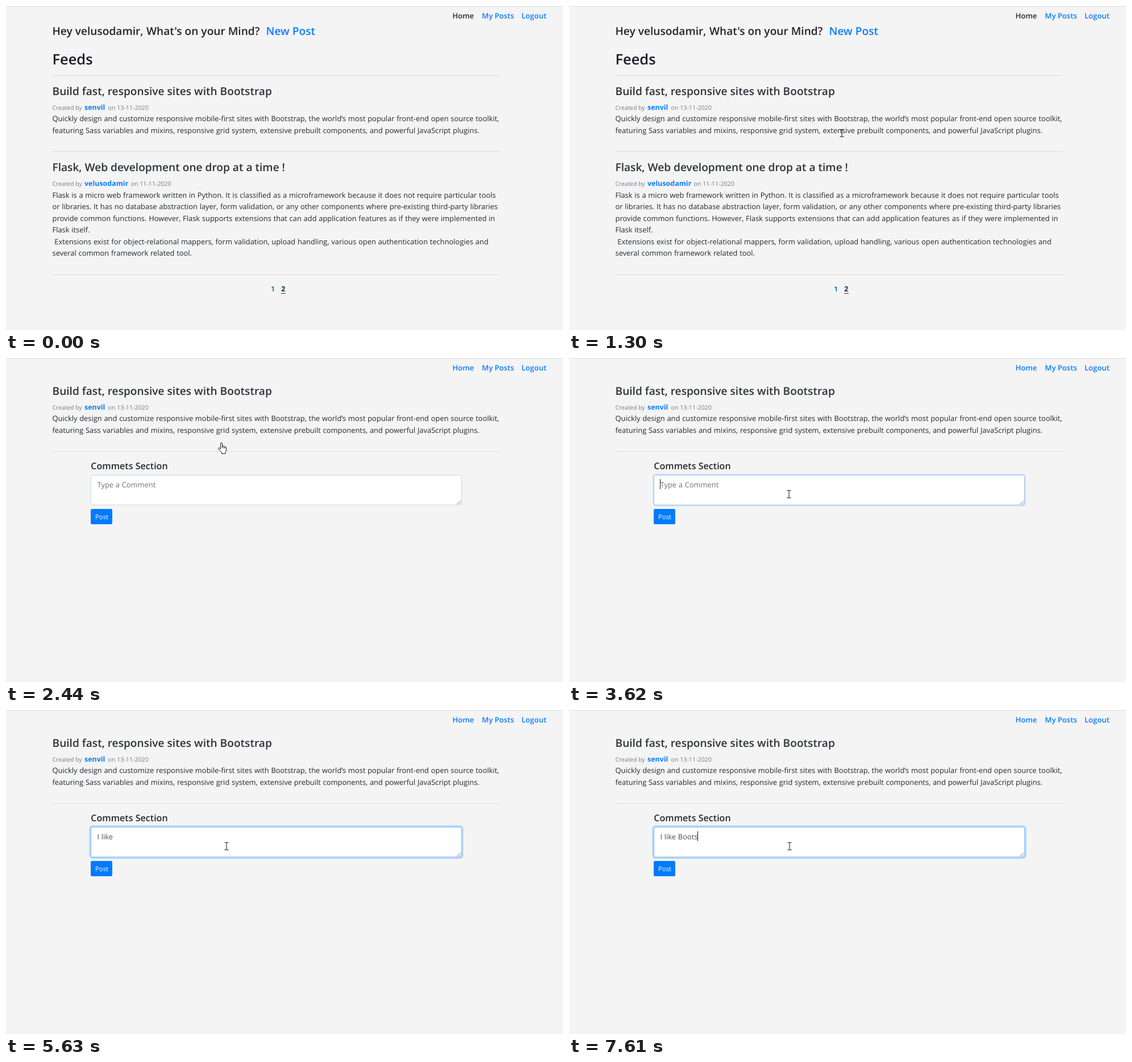
An HTML page for the animation above (8 s loop, 980 by 571 pixels).

```html
<!DOCTYPE html>
<html lang="en">
<head>
<meta charset="utf-8">
<title>Blog feed and comment</title>
<style>
  html, body { margin: 0; width: 100%; height: 100%; overflow: hidden; background: #f4f4f4; }
  svg { display: block; width: 100%; height: 100%; }
  text {
    font-family: "Open Sans", "Noto Sans", sans-serif;
    text-rendering: geometricPrecision;
    white-space: pre;
  }
  .body { font-size: 12.92px; word-spacing: .36px; fill: #26292d; }
  .head { font-size: 19.14px; font-weight: 600; fill: #2f3337; }
  .dark { fill: #212529; }
  .feeds { font-size: 25.45px; font-weight: 600; fill: #1c1c26; }
  .sub { font-size: 16.1px; font-weight: 600; fill: #26292d; }
  .nav { font-size: 13.1px; font-weight: 600; fill: #0a7cff; }
  .meta { font-size: 10.38px; fill: #747c84; }
  .date { font-size: 10.65px; fill: #747c84; }
  .bold { font-size: 12.45px; font-weight: 700; }
  .blue { fill: #0a7cff; }
  .button { font-size: 11.37px; fill: #fff; }
  .hint { fill: #6c757d; }
  .typed { fill: #495057; }
  .rule { fill: #dcdcdc; }
  .pointer { stroke: #111; stroke-width: 1; stroke-linejoin: round; fill: #fff; }
</style>
</head>
<body>
<svg id="stage" viewBox="0 0 980 571" preserveAspectRatio="none"></svg>
<script>
const LOOP = 8000;
const LEFT = 81.5;
const stage = document.getElementById('stage');

const text = (x, y, cls, str, id = '') =>
  `<text x="${x}" y="${y}" class="${cls}"${id && ` id="${id}"`}>${str}</text>`;
const rule = y => `<rect class="rule" x="81.5" y="${y}" width="788" height="1"/>`;

function article(y, title, author, dateX, date, lines, id) {
  return text(LEFT, y, 'head', title, id)
    + text(LEFT, y + 26, 'meta', 'Created by')
    + text(138, y + 26, 'bold blue', author)
    + text(dateX, y + 26, 'date', 'on ' + date)
    + lines.map((line, i) => text(LEFT, y + 46.5 + i * 20.5, 'body', line)).join('')
    + rule(y + 59.5 + lines.length * 20.5 - (lines.length > 2 ? .5 : 1));
}

const bootstrapLines = [
  'Quickly design and customize responsive mobile-first sites with Bootstrap, the world’s most popular front-end open source toolkit,',
  'featuring Sass variables and mixins, responsive grid system, extensive prebuilt components, and powerful JavaScript plugins.'
];
const flaskLines = [
  'Flask is a micro web framework written in Python. It is classified as a microframework because it does not require particular tools',
  'or libraries. It has no database abstraction layer, form validation, or any other components where pre-existing third-party libraries',
  'provide common functions. However, Flask supports extensions that can add application features as if they were implemented in',
  'Flask itself.',
  ' Extensions exist for object-relational mappers, form validation, upload handling, various open authentication technologies and',
  'several common framework related tool.'
];

stage.innerHTML = `
  <rect width="980" height="571" fill="#f4f4f4"/>
  <rect width="980" height="1" fill="#dedede"/>
  ${text(785.5, 21.5, 'nav', 'Home', 'home')}
  ${text(837.3, 21.5, 'nav', 'My Posts')}
  ${text(907, 21.5, 'nav', 'Logout')}
  <g id="post">
    ${article(156.5, 'Build fast, responsive sites with Bootstrap', 'senvil', 179.5, '13-11-2020', bootstrapLines, 'title')}
  </g>
  <g id="feed">
    ${text(LEFT, 51, 'head dark', 'Hey velusodamir,')}
    ${text(247, 51, 'head dark', "What's on your Mind?")}
    ${text(457.5, 51, 'head blue', 'New Post')}
    ${text(LEFT, 102.5, 'feeds', 'Feeds')}
    ${rule(122)}
    ${article(291, 'Flask, Web development one drop at a time !', 'velusodamir', 219.5, '11-11-2020', flaskLines)}
    ${text(466, 502.5, 'bold blue', '1')}
    ${text(484.3, 502.5, 'bold dark', '2')}
    <rect x="484" y="506" width="8" height="1" fill="#333"/>
  </g>
  <g id="comments">
    ${text(149.3, 196, 'sub', 'Commets Section')}
    <rect id="glow" fill="#007bff"/>
    <rect id="box" x="149.5" y="206.5" width="652" height="52.5" rx="3" fill="#fff"/>
    <path d="M793.5 258l6.5-6.5M797.5 258l2.5-2.5" stroke="#777" fill="none"/>
    ${text(160.5, 228, 'body hint', 'Type a Comment', 'hint')}
    ${text(160.5, 228, 'body typed', '', 'typed')}
    <rect id="caret" y="213.5" width="1" height="17.5" fill="#111"/>
    <rect x="149" y="266" width="38" height="27" rx="2.7" fill="#007bff"/>
    ${text(157, 284, 'button', 'Post')}
  </g>
  <g class="pointer">
    <path id="arrow" d="M.5 .5V14l3.2-3 2.1 5.2 2-.8-2.1-5H10z"/>
    <path id="beam" fill="none" d="M-3.5-6.5h2.5l1 .7 1-.7h2.5M0-6V6M-3.5 6.5h2.5l1-.7 1 .7h2.5"/>
    <g id="hand">
      <path d="M-1.5 11.5V2a1.5 1.5 0 0 1 3 0V7a1.4 1.4 0 0 1 2.7.3a1.4 1.4 0 0 1 2.5.6a1.2 1.2 0 0 1 1.8 1V13q0 2.5-1.5 4.5v2H.5v-2Q-3 14-5.1 11.2q-.6-1.2.5-1.8 1-.4 2 .8z"/>
      <path d="M1.5 7v3M4.2 7.5v2.7M6.7 8v2.2" fill="none"/>
    </g>
  </g>`;

const el = id => document.getElementById(id);
const show = (id, on) => el(id).setAttribute('visibility', on ? 'visible' : 'hidden');
const set = (id, attrs) => {
  for (const name in attrs) el(id).setAttribute(name, attrs[name]);
};

// time, x, y, steps towards the next stop (0 = wait), ease-out power
const track = [
  [430, 966, 556, 3, 1],
  [664, 882, 472, 7, 1],
  [1210, 536, 241, 0, 1],
  [1300, 480, 224, 7, 1.5],
  [1810, 373, 139, 0, 1],
  [1980, 379, 149, 0, 1],
  [2750, 379, 149, 5, 1],
  [3150, 387, 240, 0, 1],
  [4080, 388, 240, 0, 1]
];

// time, text so far, caret position
const typing = [
  [0, '', 160],
  [4390, 'I', 164],
  [4540, 'I ', 168],
  [4620, 'I l', 171],
  [4700, 'I li', 174],
  [4850, 'I lik', 182],
  [4930, 'I like', 188],
  [5080, 'I like ', 191],
  [6430, 'I like B', 200],
  [6660, 'I like Bo', 208],
  [6810, 'I like Boo', 216],
  [6970, 'I like Boot', 221],
  [7370, 'I like Boo', 216],
  [7440, 'I like Boot', 221],
  [7610, 'I like Boots', 226]
];

const lastIndex = (list, t) => list.reduce((found, item, i) => item[0] <= t ? i : found, -1);

function pointerAt(t) {
  const i = lastIndex(track, t);
  if (i < 0) return null;
  const [t0, x, y, steps, power] = track[i];
  if (!steps) return [x, y];
  const [t1, x1, y1] = track[i + 1];
  const p = Math.floor((t - t0) / (t1 - t0) * steps + .02) / steps;
  const e = 1 - (1 - p) ** power;
  return [x + (x1 - x) * e, y + (y1 - y) * e];
}

function pointerKind(x, y, onFeed) {
  if (!onFeed) return y < 150 ? 'hand' : y > 206 ? 'beam' : 'arrow';
  if (y < 163 && x < 468) return 'hand';
  const overText = (y > 187 && y < 230) || (y > 323 && y < 445);
  return overText && x < 869 ? 'beam' : 'arrow';
}

function drawPointer(t, onFeed) {
  const pos = pointerAt(t);
  const kind = pos && pointerKind(...pos, onFeed);
  for (const id of ['arrow', 'beam', 'hand']) {
    show(id, id === kind);
    if (id === kind) set(id, { transform: `translate(${Math.round(pos[0])} ${Math.round(pos[1])})` });
  }
  return kind;
}

function drawComment(t) {
  const focus = t < 3530 ? 0 : t < 3620 ? .3 : t < 3700 ? .65 : 1;
  const grow = 2.7 * focus;
  set('glow', {
    x: 149 - grow, y: 206 - grow, width: 653 + 2 * grow, height: 53.5 + 2 * grow,
    rx: 3.5 + grow, opacity: .25 * focus
  });
  const mix = (a, b) => Math.round(a + (b - a) * focus);
  set('box', { stroke: `rgb(${mix(206, 128)},${mix(212, 189)},${mix(218, 255)})` });

  const [, str, caretX] = typing[lastIndex(typing, t)];
  el('typed').textContent = str;
  show('hint', !str);
  const blinkOff = (t >= 4000 && t < 4390) || (t >= 5630 && t < 6180);
  set('caret', { x: caretX });
  show('caret', t >= 3530 && !blinkOff);
}

function render(t) {
  const onFeed = t < 2440;
  el('feed').style.display = onFeed ? '' : 'none';
  el('comments').style.display = onFeed ? 'none' : '';
  set('post', { transform: `translate(0 ${onFeed ? 0 : -92})` });
  el('home').style.fill = onFeed ? '#26292d' : '';
  if (!onFeed) drawComment(t);
  else ['hint', 'caret'].forEach(id => show(id, false));
  const kind = drawPointer(t, onFeed);
  el('title').style.fill = onFeed && kind === 'hand' ? '#0c0d0f' : '';
}

const start = performance.now();
function frame() {
  render((performance.now() - start) % LOOP);
  requestAnimationFrame(frame);
}
render(0);
requestAnimationFrame(frame);
</script>
</body>
</html>
```
